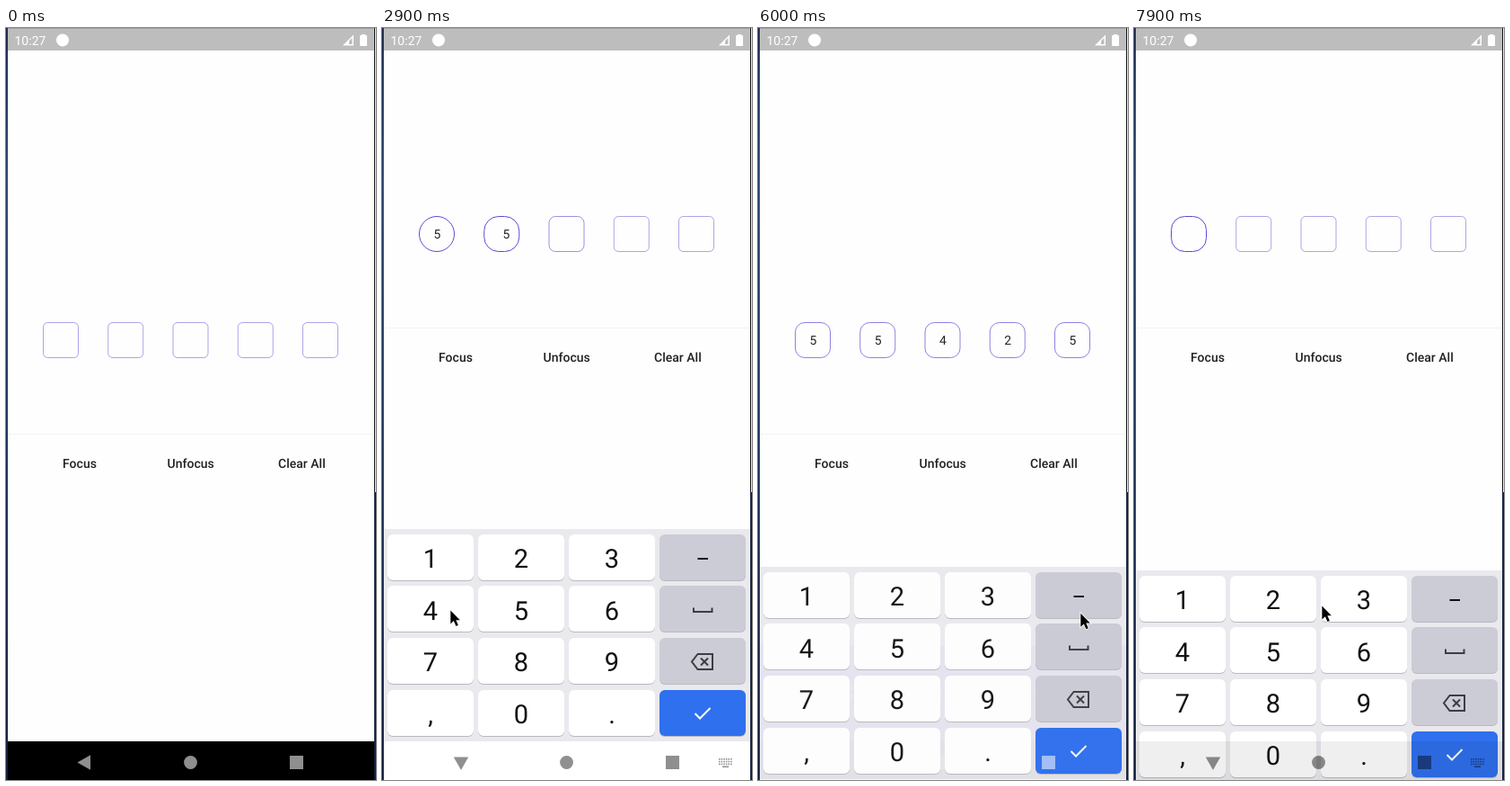
An HTML page with a canvas that plays this animation: 412x836 px, repeating every 8 s.

```html
<!DOCTYPE html>
<html lang="en">
<head>
<meta charset="utf-8">
<title>Pin entry</title>
<style>
html, body { margin: 0; width: 100%; height: 100%; overflow: hidden; background: #fff; }
canvas { display: block; }
</style>
</head>
<body>
<canvas id="stage" width="412" height="836"></canvas>
<script>
const ctx = document.getElementById('stage').getContext('2d');
const LOOP = 8000;
const RAISE = 118;
const LABELS = ['Focus', 'Unfocus', 'Clear All'];
const KEYS = ['123', '456', '789', ',0.'];

// The whole story: when the pointer presses what
const PRESSES = [
  [1920, 'Focus'], [2580, '5'], [2765, '5'], [3100, '4'], [3480, '2'],
  [4040, '5'], [5800, 'Done'], [6650, 'Clear All'], [7600, 'Focus'],
].map(([time, name]) => ({ time, name }));

// The screen reacts a little after each press
const STATES = [{ time: -999, pin: '', focused: false }];
for (const { time, name } of PRESSES) {
  const { pin, focused } = STATES.at(-1);
  STATES.push({
    time: time + 100,
    pin: name === 'Clear All' ? '' : /\d/.test(name) ? pin + name : pin,
    focused: name === 'Focus' || (focused && name !== 'Done'),
  });
}
const FULL = STATES.find(s => s.pin.length === 5);
const OPENED = STATES.filter((s, i) => i && s.focused && !STATES[i - 1].focused);
const CLOSED = STATES.find((s, i) => i && !s.focused && STATES[i - 1].focused);

const clamp = v => Math.max(0, Math.min(1, v));
const prog = (t, start, span) => clamp((t - start) / span);
const mix = (a, b, p) => a + (b - a) * p;
const easeOut = p => 1 - (1 - p) ** 2;
const smooth = p => p * p * (3 - 2 * p);
const stateIndex = t => STATES.findLastIndex(s => s.time <= t);
const focusedAt = t => STATES[stateIndex(t)].focused;

const keyX = c => 6 + 101 * c;
const keyY = r => 562.7 + 57.7 * r;
const labelX = i => 82 + 123.7 * i;

function rect(x, y, w, h, color) {
  ctx.fillStyle = color;
  ctx.fillRect(x, y, w, h);
}

function round(x, y, w, h, r, color) {
  ctx.beginPath();
  ctx.roundRect(x, y, w, h, r);
  if (!color) return ctx.stroke();
  ctx.fillStyle = color;
  ctx.fill();
}

function path(...pts) {
  ctx.beginPath();
  for (let i = 0; i < pts.length; i += 2) ctx.lineTo(pts[i], pts[i + 1]);
}

function poly(color, ...pts) {
  path(...pts);
  ctx.fillStyle = color;
  ctx.fill();
}

function line(...pts) {
  path(...pts);
  ctx.stroke();
}

function dot(x, y, r, color) {
  ctx.fillStyle = color;
  ctx.beginPath();
  ctx.arc(x, y, r, 0, 7);
  ctx.fill();
}

function text(str, x, y, size, color, weight = 400, align = 'center') {
  ctx.font = `${weight} ${size}px Roboto, sans-serif`;
  ctx.textRendering = 'geometricPrecision';
  ctx.textAlign = align;
  ctx.fillStyle = color;
  ctx.fillText(str, x, y);
}

function statusBar() {
  rect(0, 0, 412, 25, '#bdbdbd');
  rect(0, 0, 412, 1, '#a0a0a0');
  text('10:27', 9.5, 19, 14, '#fff', 400, 'left');
  dot(63, 13.5, 7, '#fff');
  poly('#fff', 375, 19.5, 387, 7.5, 387, 19.5);
  poly('#bdbdbd', 382, 14.5, 385.5, 11, 385.5, 18, 382, 18);
  round(394, 8, 8, 12, 1, '#fff');
  rect(396, 7, 4, 2, '#fff');
}

function edges() {
  const side = ctx.createLinearGradient(0, 0, 0, 836);
  side.addColorStop(0, '#1d2c4d');
  side.addColorStop(0.2, '#2c4570');
  side.addColorStop(1, '#12203c');
  rect(0, 0, 2, 836, side);
  rect(410, 0, 1, 516, '#111');
  rect(411, 0, 1, 516, '#f4f4f4');
  rect(410, 516, 2, 320, '#14233f');
}

// Corner radius and border strength of one box
function boxStyle({ pin, focused }, i) {
  if (!focused || i > pin.length) return [5, 0.5];
  return [i < pin.length ? 20 : 15, 1];
}

function pinBoxes(t, top) {
  const k = stateIndex(t);
  const now = STATES[k], was = STATES[Math.max(0, k - 1)];
  const p = prog(t, now.time, 160);
  for (let i = 0; i < 5; i++) {
    const cx = 61 + 72.25 * i;
    const [r0, a0] = boxStyle(was, i), [r1, a1] = boxStyle(now, i);
    ctx.strokeStyle = `rgba(98,72,212,${mix(a0, a1, p)})`;
    ctx.lineWidth = 1;
    round(cx - 19.5, top + 0.5, 39, 39, Math.min(19.5, mix(r0, r1, p)));
    const digit = now.pin[i] || (p < 1 && was.pin[i]);
    if (!digit) continue;
    const out = now.pin[i] === was.pin[i] ? 0 : now.pin[i] ? 1 - p : p;
    text(digit, cx + 0.3 + 6.4 * out, top + 25, 13.9, '#212121');
  }
}

function buttons(t, y) {
  rect(2, y - 33, 408, 1, '#f3f3f4');
  LABELS.forEach((label, i) => {
    for (const { time, name } of PRESSES) {
      const glow = prog(t, time, 80) * (1 - prog(t, time + 200, 80));
      if (name === label && glow)
        round(labelX(i) - 44, y - 18, 88, 35, 2, `rgba(0,0,0,${0.08 * glow})`);
    }
    text(label, labelX(i), y + 5, 14, '#212121', 500);
  });
}

function snack(t, bottom) {
  const start = FULL.time + 60;
  const h = 107 * (smooth(prog(t, start, 250)) - smooth(prog(t, start + 3150, 250)));
  if (!h) return;
  ctx.save();
  ctx.beginPath();
  ctx.rect(2, bottom - h, 408, h);
  ctx.clip();
  rect(2, bottom - h, 408, h, '#7c4dff');
  text(`Pin Submitted. Value: ${FULL.pin}`, 205.7, bottom - h + 62, 24.8, '#fff');
  ctx.restore();
}

const navSquare = color => rect(316, 809, 15, 15, color);

function navIcons(turn, showKeys, color) {
  ctx.save();
  ctx.translate(88, 816.5);
  ctx.rotate(-turn * Math.PI / 2);
  poly(color, -8.5, 0, 6, -8.2, 6, 8.2);
  ctx.restore();
  dot(205.5, 816.5, 7.4, color);
  navSquare(color);
  if (!showKeys) return;
  for (let r = 0; r < 3; r++)
    for (let c = 0; c < 6; c++) rect(375 + c * 2.6, 812 + r * 2.8, 1.6, 1.6, color);
  rect(379, 820.5, 7, 1.5, color);
}

function sideIcon(row) {
  ctx.strokeStyle = ['#111', '#3c3d42', '#3c3d42', '#fff'][row];
  ctx.lineWidth = 2;
  if (row === 0) line(351.5, 590, 363, 590);
  if (row === 1) line(347, 644.5, 347, 649, 367.5, 649, 367.5, 644.5);
  if (row === 2) {
    line(351.5, 696, 345, 704.5, 351.5, 713, 368, 713, 368, 696, 351, 696);
    line(355, 700.5, 363, 708.5);
    line(363, 700.5, 355, 708.5);
  }
  if (row === 3) line(348.5, 762, 354, 767.5, 365.5, 756);
}

function keyboard() {
  rect(2, 557, 408, 236, '#e9e9ee');
  rect(2, 793, 408, 43, '#fff');
  KEYS.forEach((keys, r) => {
    const y = Math.round(keyY(r));
    for (let c = 0; c < 4; c++) {
      const x = keyX(c);
      round(x, y + 1, 96, 51, 6, '#b9b9c0');
      round(x, y, 96, 51, 6, c < 3 ? '#fff' : r < 3 ? '#cbccd5' : '#2f70ee');
      if (c < 3) text(keys[c], x + 48, Math.round(keyY(r) + 37.3), 29, '#111');
    }
    sideIcon(r);
  });
}

// The keyboard window slides a fifth of its height while fading
function keyPanel(t, turn) {
  const open = OPENED.findLast(s => s.time <= t);
  if (!open) return;
  const start = open.time + 180;
  const enter = prog(t, start, 200);
  const leave = open.time < CLOSED.time ? prog(t, CLOSED.time + 20, 160) : 0;
  if (!enter || leave === 1) return;
  ctx.save();
  ctx.beginPath();
  ctx.rect(2, 0, 408, 836);
  ctx.clip();
  ctx.globalAlpha = prog(t, start, 20) * (1 - leave ** 5);
  ctx.translate(0, Math.round(57 * (1 - easeOut(enter)) + 56 * easeOut(leave)));
  keyboard();
  ctx.restore();
  if (leave) return navSquare('rgba(255,255,255,.55)');
  rect(2, 793, 408, 43, `rgba(0,0,0,${0.07 * (1 - enter)})`);
  navIcons(turn, true, 'rgba(0,0,0,.44)');
}

// Resting point of the pointer for each thing it presses
function place(name) {
  if (name === 'Done') return [379, 751];
  const i = LABELS.indexOf(name);
  if (i >= 0) return [labelX(i) - 5 * (i / 2), 484 - (i ? 4 : -3)];
  const r = KEYS.findIndex(keys => keys.includes(name));
  return [keyX(KEYS[r].indexOf(name)) + 48, keyY(r) + 27];
}

const STOPS = [
  { time: 700, at: [322, 582] },
  ...PRESSES.map(({ time, name }) => ({ time, at: place(name) })),
  { time: LOOP, at: [219, 655] },
];

function pointer(t) {
  if (t < 400) return;
  const k = Math.max(0, STOPS.findLastIndex(s => s.time <= t));
  const [x0, y0] = STOPS[k].at, [x1, y1] = STOPS[k + 1].at;
  const travel = 1.5 * Math.hypot(x1 - x0, y1 - y0) || 1;
  const p = smooth(prog(t, STOPS[k].time + 30, travel));
  ctx.save();
  ctx.translate(mix(x0, x1, p), mix(y0, y1, p));
  path(0.5, 0, 0.5, 15, 4, 11.7, 6.6, 17.5, 9, 16.4, 6.5, 10.8, 11, 10.8);
  ctx.closePath();
  ctx.lineWidth = 1.6;
  ctx.strokeStyle = '#fff';
  ctx.stroke();
  ctx.fillStyle = '#000';
  ctx.fill();
  ctx.restore();
}

function draw(t) {
  const raised = focusedAt(t - 10);
  const up = raised ? RAISE : 0;
  const turn = OPENED.reduce((sum, s) => sum + prog(t, s.time + 20, 180), 0)
    - prog(t, CLOSED.time + 50, 150);
  rect(0, 0, 412, 836, '#fefefe');
  pinBoxes(t, 327 - up);
  buttons(t, 484 - up);
  snack(t, raised ? 557 : 793);
  rect(2, 793, 408, 43, '#000');
  navIcons(turn, focusedAt(t - 30), '#8f8f8f');
  keyPanel(t, turn);
  statusBar();
  edges();
  pointer(t);
}

const begin = performance.now();
function tick() {
  draw((performance.now() - begin) % LOOP);
  requestAnimationFrame(tick);
}
tick();
</script>
</body>
</html>
```
